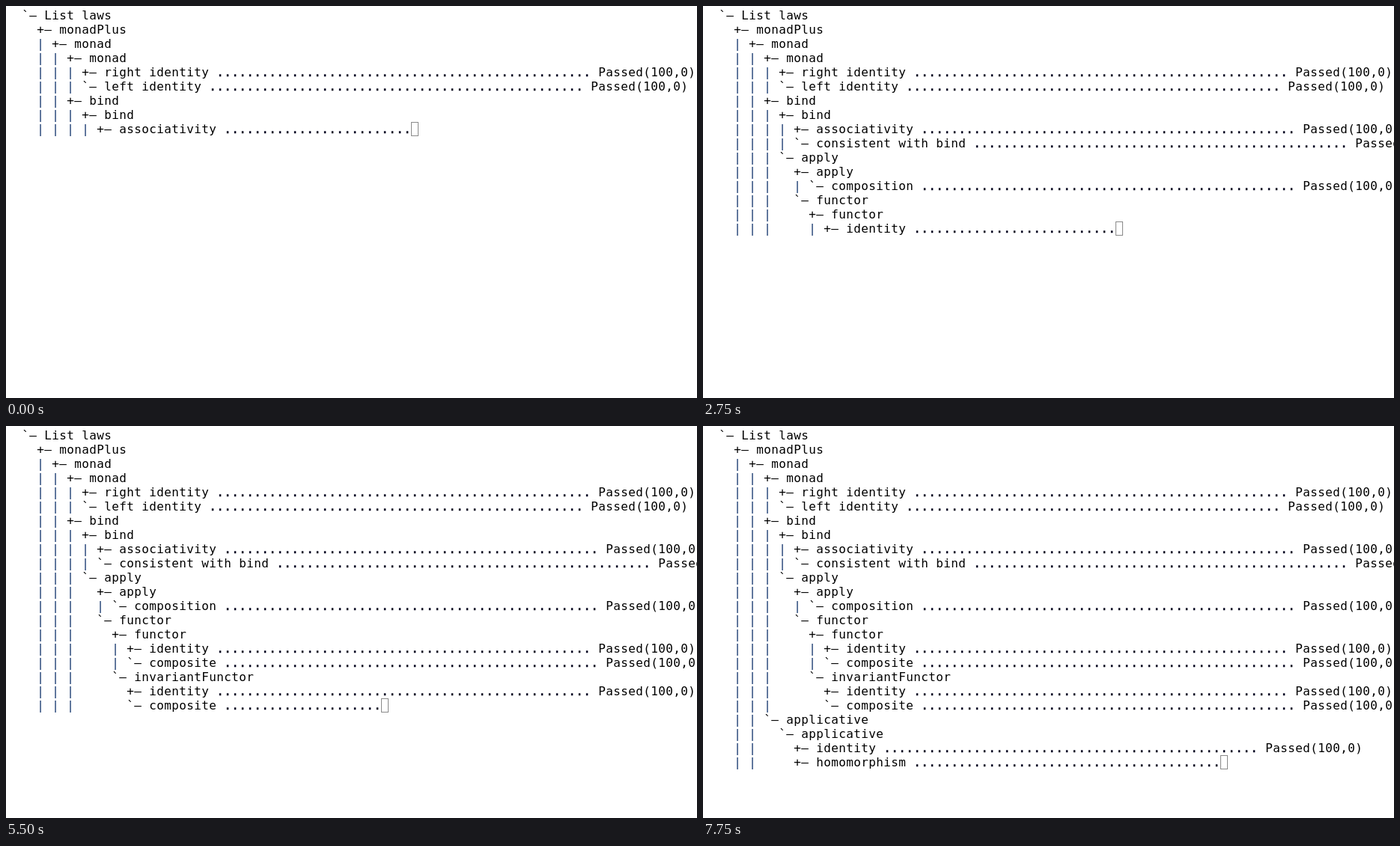
An HTML page for the animation above (8000 ms loop, 923 by 524 pixels).

```html
<!DOCTYPE html>
<html lang="en">
<head>
<meta charset="utf-8">
<title>List laws</title>
<style>
  html, body { margin: 0; width: 100%; height: 100%; overflow: hidden; background: #fff; }
  svg { display: block; }
  text { font: 16px "DejaVu Sans Mono", monospace; fill: #000; }
  .bar { fill: #17386f; }
  .dots { fill: #00001a; stroke: #00001a; stroke-width: .5px; }
  #cursor { fill: none; stroke: #8a8a8a; stroke-width: 1px; }
</style>
</head>
<body>
<svg width="923" height="524" viewBox="0 0 923 524">
  <g id="screen"></g>
  <rect id="cursor" width="9" height="18"/>
</svg>
<script>
const LOOP = 8000, STEP = 250, DOTS = 50;
const CELL = 10, LINE = 19, LEFT = 1, TOP = 3, BASE = 15;

// Lines ending in ":" are tests, which print dots and then a result.
const tree = [
  "  `- List laws",
  "    +- monadPlus",
  "    | +- monad",
  "    | | +- monad",
  "    | | | +- right identity:",
  "    | | | `- left identity:",
  "    | | +- bind",
  "    | | | +- bind",
  "    | | | | +- associativity:",
  "    | | | | `- consistent with bind:",
  "    | | | `- apply",
  "    | | |   +- apply",
  "    | | |   | `- composition:",
  "    | | |   `- functor",
  "    | | |     +- functor",
  "    | | |     | +- identity:",
  "    | | |     | `- composite:",
  "    | | |     `- invariantFunctor",
  "    | | |       +- identity:",
  "    | | |       `- composite:",
  "    | | `- applicative",
  "    | |   `- applicative",
  "    | |     +- identity:",
  "    | |     +- homomorphism:"
];

// [time in ms, dots printed since the third test began]
const pace = [[0, 25], [1000, 80], [2000, 135], [3500, 218], [5500, 321],
              [6250, 358], [7500, 427], [7750, 441]];

const screen = document.getElementById("screen");
const cursor = document.getElementById("cursor");

function node(name, attrs, parent) {
  const el = document.createElementNS("http://www.w3.org/2000/svg", name);
  for (const key in attrs) el.setAttribute(key, attrs[key]);
  return parent.appendChild(el);
}

const rows = tree.map((line, i) => ({
  isTest: line.endsWith(":"),
  label: line.replace("-", "–").replace(":", " "),
  el: node("text", { y: TOP + i * LINE + BASE }, screen),
  shown: ""
}));

function setRow(row, str) {
  if (row.shown === str) return;
  row.shown = str;
  row.el.textContent = "";
  for (const m of str.matchAll(/\.+|\||[^.| ]+/g)) {
    const run = m[0];
    const x = [...run].map((_, i) => LEFT + .2 + (m.index + i) * CELL).join(" ");
    const cls = run[0] === "." ? "dots" : run === "|" ? "bar" : "word";
    node("tspan", { x, class: cls }, row.el).textContent = run;
  }
}

function dotsAt(t) {
  let i = 1;
  while (i < pace.length - 1 && t > pace[i][0]) i++;
  const [t0, d0] = pace[i - 1], [t1, d1] = pace[i];
  return Math.round(d0 + (d1 - d0) * Math.min(1, (t - t0) / (t1 - t0)));
}

function draw(t) {
  let left = dotsAt(t) + 2 * DOTS;
  let typing = true;
  rows.forEach((row, i) => {
    if (!typing) return setRow(row, "");
    if (!row.isTest) return setRow(row, row.label);
    if (left >= DOTS) {
      left -= DOTS;
      return setRow(row, row.label + ".".repeat(DOTS) + " Passed(100,0)");
    }
    const str = row.label + ".".repeat(left);
    setRow(row, str);
    cursor.setAttribute("x", LEFT + str.length * CELL + .5);
    cursor.setAttribute("y", TOP + i * LINE + .5);
    typing = false;
  });
}

const start = performance.now();
function tick() {
  const t = (performance.now() - start) % LOOP;
  draw(Math.floor(t / STEP) * STEP);
  requestAnimationFrame(tick);
}
draw(0);
requestAnimationFrame(tick);
</script>
</body>
</html>
```
